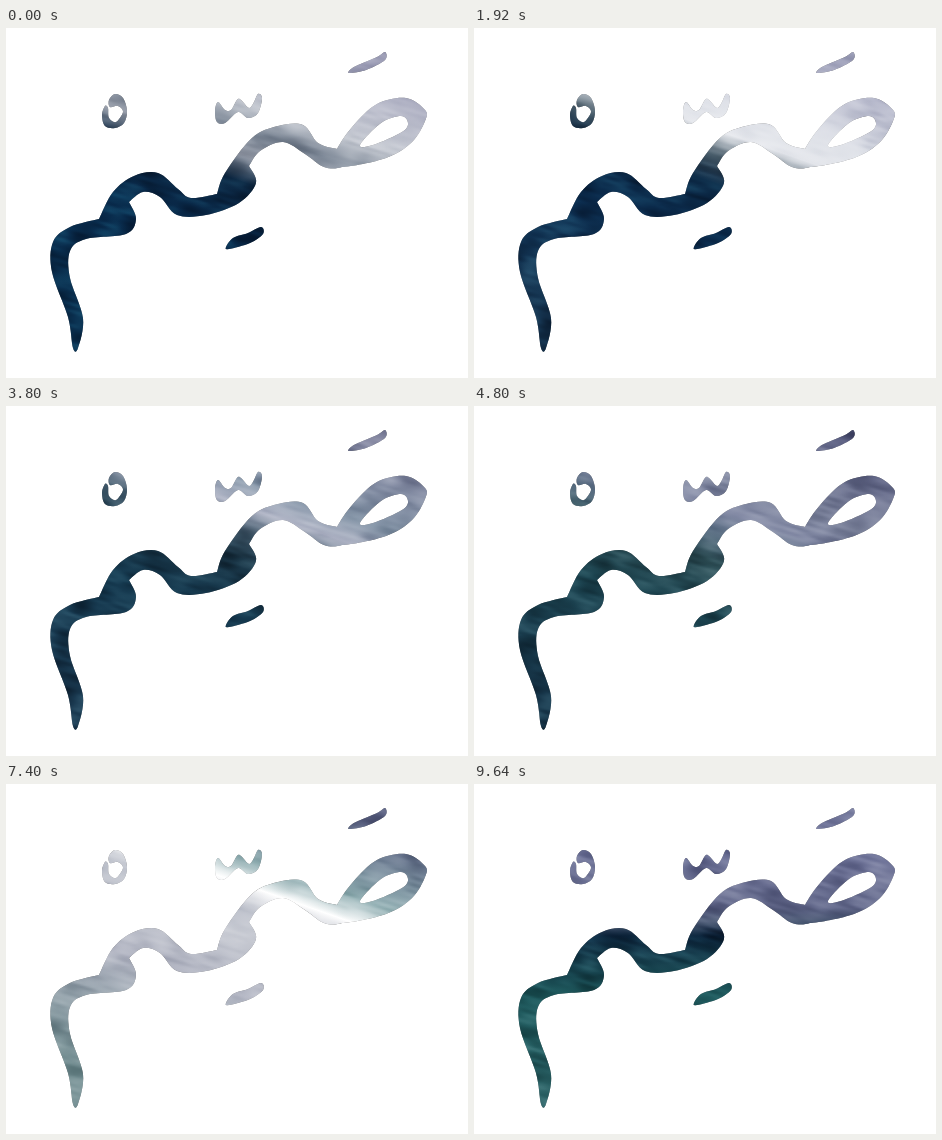
An HTML page with a canvas that plays this animation: 462 px wide and 350 px high, repeating every 9680 ms.

```html
<!DOCTYPE html>
<html lang="ar">
<head>
<meta charset="utf-8">
<style>
  html, body { margin: 0; width: 100%; height: 100%; overflow: hidden; background: #fff; }
  canvas { display: block; }
</style>
</head>
<body>
<canvas id="stage" width="462" height="350"></canvas>
<script>
const W = 462, H = 350, LOOP = 9680, STEP = 40;
const ctx = document.getElementById('stage').getContext('2d');

// Closed Catmull-Rom outline; a repeated point makes a corner.
function addOutline(path, text) {
  const pts = text.trim().split(/\s+/).map(p => p.split(',').map(Number));
  const n = pts.length;
  path.moveTo(...pts[0]);
  for (let i = 0; i < n; i++) {
    const [a, b, c, d] = [n - 1, 0, 1, 2].map(k => pts[(i + k) % n]);
    path.bezierCurveTo(b[0] + (c[0] - a[0]) / 6, b[1] + (c[1] - a[1]) / 6,
      c[0] - (d[0] - b[0]) / 6, c[1] - (d[1] - b[1]) / 6, c[0], c[1]);
  }
  path.closePath();
}

// The hole runs against the direction of its outer contour.
const outlines = {
  body: `67,320 62,289 46,244 47,214 64,199 93,191 93,191 107,164 128,148 152,145
    172,161 185,170 211,166 211,166 219,145 246,110 272,98 297,97 312,115 331,121 331,121
    350,128 336,139 318,139 299,126 277,114 254,123 243,138 243,138
    250,155 233,175 200,187 171,187 154,169 137,164 123,174 123,174
    130,191 120,206 80,211 64,223 64,250 77,290 72,320`,
  loop: '331,121 347,98 371,76 400,70 419,82 419,93 406,114 380,130 336,139 330,131',
  loopHole: '354,117 367,117 396,104 402,95 395,88 375,95',
  sukun: `109,66 117,70 121,83 118,95 109,100 99,98 96,87 99,78 102,80
    103,90 110,94 117,84 112,78 104,79 103,72`,
  shadda: `212,74 219,82 225,82 231,72 235,72 243,80 248,74 252,66
    256,70 252,85 242,90 232,84 219,95 211,94 209,83`,
  fatha: '343,43 350,38 371,29 379,24 379,32 360,42 344,45',
  kasra: '220,219 227,210 242,205 255,199 257,206 244,215 223,221'
};
const lettering = new Path2D();
Object.values(outlines).forEach(text => addOutline(lettering, text));

// Sky fading into sea: gradient stops by height, horizon tilt, and a palette per mood.
const levels = [-10, 72, 98, 124, 152, 210, 340];
const span = levels[6] - levels[0];
const mood = (time, tilt, palette) => ({
  time, tilt,
  colours: palette.split(' ').map(hex => [0, 2, 4].map(i => parseInt(hex.substr(i, 2), 16)))
});
const moods = [
  mood(0, .35, '9a9bb4 c8ccd4 7a8594 9aa0ac 0c2742 08294a 0a3050'),
  mood(1920, .35, 'a9abc2 dcdfe6 e6e8ed 4a5e6c 0b2743 0b2c4e 153450'),
  mood(2840, .35, 'a3a5b8 8ba4b0 d5d9e0 34505f 081f38 0f2f4e 1a3a54'),
  mood(4800, .35, '565a7d 858ca4 7d84a0 50657a 2f5058 1c4450 17364a'),
  mood(6000, .35, '404d74 60728a 848ca4 46617a 64788a 3a5465 0a2a40'),
  mood(7400, .35, '555b7c 93b0b4 ffffff b8bcc7 c3c6cf b4b7c4 6f8a8e'),
  mood(9640, 0, '7a7ea0 70759a 686d90 666c8e 0a2036 1f5a5e 2c6064')
];
const mix = (a, b, k) => a + (b - a) * k;

function skyAndSea(t) {
  const next = Math.max(1, moods.findIndex(m => m.time >= t));
  const a = moods[next - 1], b = moods[next];
  const k = (t - a.time) / (b.time - a.time);
  const tilt = mix(a.tilt, b.tilt, k), reach = span / (1 + tilt * tilt);
  const gradient = ctx.createLinearGradient(W / 2, levels[0], W / 2 - tilt * reach, levels[0] + reach);
  levels.forEach((level, i) => {
    const rgb = a.colours[i].map((v, j) => Math.round(mix(v, b.colours[i][j], k)));
    gradient.addColorStop((level - levels[0]) / span, `rgb(${rgb})`);
  });
  return gradient;
}

// Drifting clouds and slanted wave streaks from seeded value noise.
let seed = 7;
const lattice = Float32Array.from({ length: 4096 }, () => {
  seed = (seed * 16807) % 2147483647;
  return seed / 1073741823 - 1;
});
const ease = f => f * f * (3 - 2 * f);
function noise(x, y) {
  const ix = Math.floor(x), iy = Math.floor(y), u = ease(x - ix);
  const at = (i, j) => lattice[(i & 63) + ((j & 63) << 6)];
  const row = j => mix(at(ix, j), at(ix + 1, j), u);
  return mix(row(iy), row(iy + 1), ease(y - iy));
}

const waves = document.createElement('canvas');
waves.width = W / 2;
waves.height = H / 2;
const wavesCtx = waves.getContext('2d');
const image = wavesCtx.createImageData(waves.width, waves.height);

function paintWaves(t) {
  const drift = t / 1000;
  for (let y = 0, p = 0; y < waves.height; y++) {
    for (let x = 0; x < waves.width; x++, p += 4) {
      const cloud = noise(x / 9 + drift, y / 7 - drift * .6);
      const streak = noise((x + y * .4) / 11 - drift, (y - x * .3) / 1.8 + drift * 1.5);
      const grey = 128 + 45 * cloud + 35 * streak;
      image.data[p] = image.data[p + 1] = image.data[p + 2] = grey;
      image.data[p + 3] = 255;
    }
  }
  wavesCtx.putImageData(image, 0, 0);
}

let shown = -1;
function frame() {
  const t = Math.floor(performance.now() % LOOP / STEP) * STEP;
  if (t !== shown) {
    shown = t;
    paintWaves(t);
    ctx.clearRect(0, 0, W, H);
    ctx.save();
    ctx.clip(lettering);
    ctx.fillStyle = skyAndSea(t);
    ctx.fillRect(0, 0, W, H);
    ctx.globalCompositeOperation = 'soft-light';
    ctx.drawImage(waves, 0, 0, W, H);
    ctx.restore();
  }
  requestAnimationFrame(frame);
}
frame();
</script>
</body>
</html>
```
